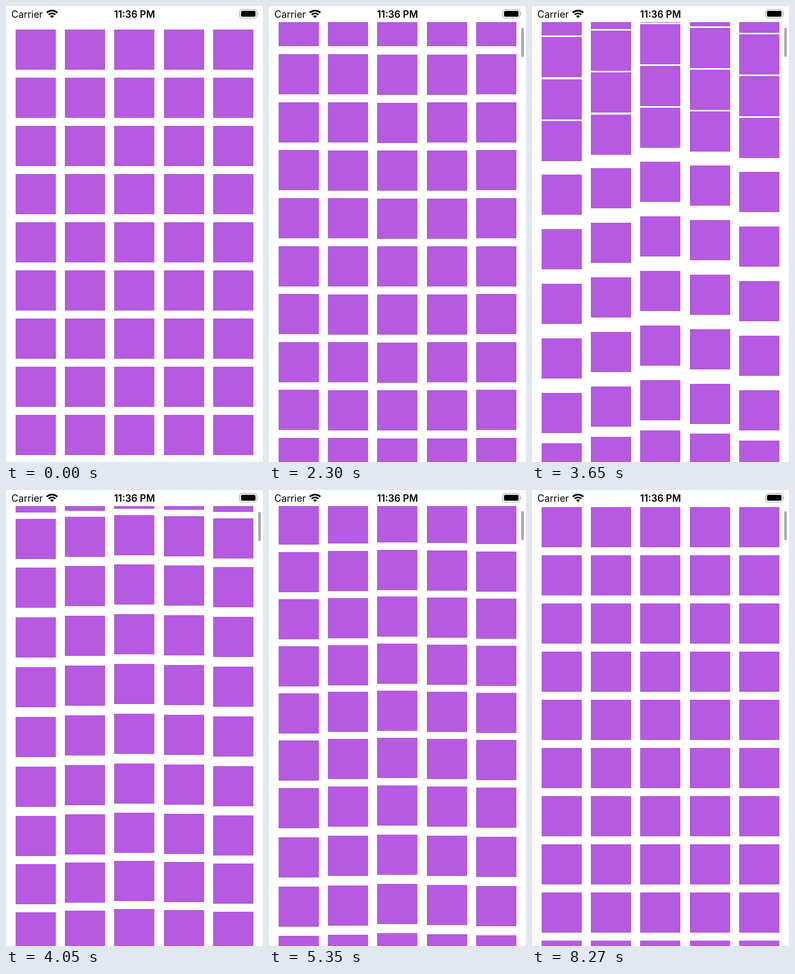
Recreate the animation shown at these times as an HTML page with a canvas. Size 480 px wide and 852 px high, loop 8330 ms.

```html
<!DOCTYPE html>
<html lang="en">
<head>
<meta charset="utf-8">
<title>Springy grid</title>
<style>
html, body { margin: 0; width: 100%; height: 100%; overflow: hidden; background: #fff; }
canvas, svg { position: absolute; left: 0; top: 0; }
text { font: 18px Inter, Roboto, sans-serif; }
</style>
</head>
<body>
<canvas id="grid" width="480" height="852"></canvas>
<svg width="480" height="852" viewBox="0 0 480 852">
  <rect width="480" height="30" fill="#fff"/>
  <text x="10" y="22">Carrier</text>
  <text x="240" y="22" text-anchor="middle" style="font-weight:600">11:36 PM</text>
  <g fill="none" stroke="#000" stroke-width="3.2">
    <path d="M76.2 12.7a13.9 13.9 0 0 1 19.6 0"/>
    <path d="M79.8 16.3a8.8 8.8 0 0 1 12.4 0"/>
  </g>
  <path d="M82.4 18.9a5.1 5.1 0 0 1 7.2 0L86 22.5z"/>
  <rect x="436.5" y="6.5" width="32" height="16" rx="4.5" fill="none" stroke="#999" stroke-width="1.2"/>
  <rect x="439" y="9" width="27" height="11" rx="2.5"/>
  <path d="M470 12q2 2.5 0 5z" fill="#999"/>
</svg>
<script>
const LOOP = 8330, START = 1600, LAST = 8270, STEP = 50;
const SIZE = 75, PITCH_X = 92.25, PITCH_Y = 90, TOP = 43.5;
const ctx = document.getElementById('grid').getContext('2d');

// Turning points of each swing as [time, value]; swings between them are half cosines.
const scroll = [[1550, 360], [2300, -132.5], [3150, 260], [3970, -183], [5175, 325], [6000, 354], [LAST, 348.5]];
const lag = [[1550, 0], [2000, .1], [2620, -.12], [3650, .132], [4550, -.1056], [5300, .023], [6000, 0]];
const fingerX = [[3650, 260], [4550, 249]];
const fingerY = [[3650, 265], [4550, 315], [5350, 238]];

function swing(points, t) {
  let [t0, value] = points[0];
  for (const [t1, next] of points.slice(1)) {
    if (t <= t0) break;
    const u = Math.min(1, (t - t0) / (t1 - t0));
    value += (next - value) * (1 - Math.cos(Math.PI * u)) / 2;
    t0 = t1;
  }
  return value;
}

function drawSquare(x, y) {
  ctx.fillRect(x, y, SIZE, SIZE);
  ctx.strokeRect(x + .5, y + .5, SIZE - 1, SIZE - 1);
}

function draw(ms) {
  const moving = ms >= START;
  const t = !moving ? 0 : ms >= LAST ? LAST : ms - (ms - START) % STEP;
  const offset = swing(scroll, t), k = swing(lag, t);
  const fx = swing(fingerX, t), fy = swing(fingerY, t);
  ctx.clearRect(0, 0, 480, 852);

  // Squares trail the scroll in proportion to their distance from the finger.
  ctx.fillStyle = '#b55ae1';
  ctx.strokeStyle = '#ae55da';
  for (let col = 0; col < 5; col++) {
    const x = Math.floor(18.3 + PITCH_X * col);
    const dx = Math.abs(x + SIZE / 2 - fx);
    for (let row = -8; row < 15; row++) {
      const y = TOP + PITCH_Y * row;
      let dy = Math.abs(y + SIZE / 2 - fy);
      if (k > 0) dy = Math.min(dy, 475);
      drawSquare(x, Math.round(y + offset + k * (dx + dy)));
    }
  }

  if (moving) {
    ctx.fillStyle = '#acacac';
    ctx.beginPath();
    ctx.roundRect(471, 40.4 - .0028 * offset, 5, 54.5, 2.5);
    ctx.fill();
  }
}

const begin = performance.now();
function frame() {
  draw((performance.now() - begin) % LOOP);
  requestAnimationFrame(frame);
}
frame();
</script>
</body>
</html>
```
